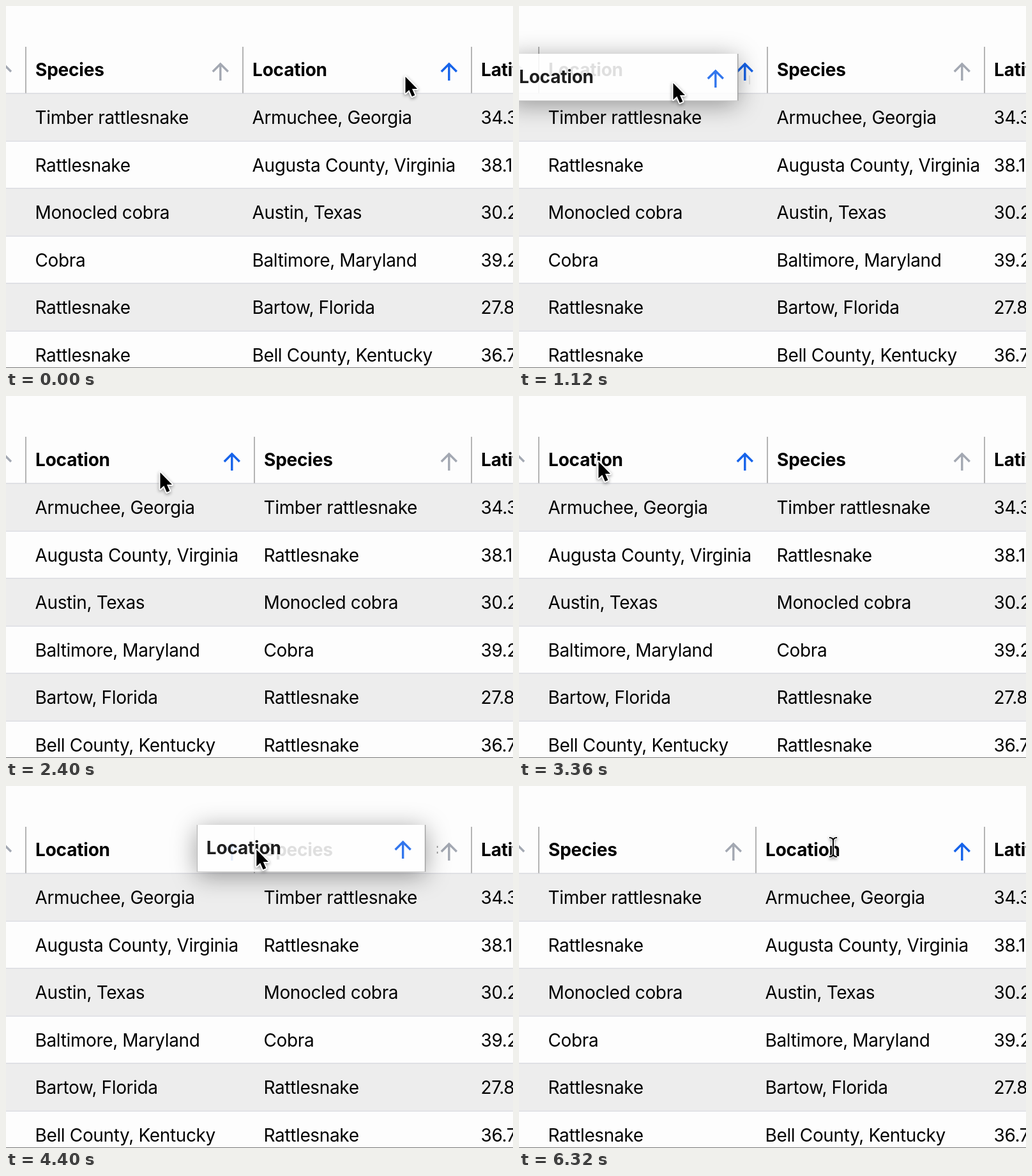
An HTML page with a canvas for the animation above (6.4 s loop, 794 by 568 pixels).

```html
<!DOCTYPE html>
<html lang="en">
<head>
<meta charset="utf-8">
<title>Column reordering</title>
<style>
html, body { margin: 0; height: 100%; overflow: hidden; background: #fdfdfd; }
canvas { display: block; }
</style>
</head>
<body>
<canvas id="stage" width="794" height="568"></canvas>
<script>
const ctx = document.getElementById('stage').getContext('2d');
const LOOP = 6400, STEP = 80;
const HEAD_TOP = 64, HEAD_BOTTOM = 137, ROW = 74.5;
const BLUE = '#1663ea', GRAY = '#a3a8b2', RULE = '#949494';
const WIDTH = { Species: 340, Location: 358 };

const rows = [
  ['Timber rattlesnake', 'Armuchee, Georgia', '34.3'],
  ['Rattlesnake', 'Augusta County, Virginia', '38.1'],
  ['Monocled cobra', 'Austin, Texas', '30.2'],
  ['Cobra', 'Baltimore, Maryland', '39.2'],
  ['Rattlesnake', 'Bartow, Florida', '27.8'],
  ['Rattlesnake', 'Bell County, Kentucky', '36.7']
];

// time, pointer x, pointer y
const pointerPath = [
  [0, 625, 110], [400, 625, 110], [480, 618, 111], [560, 580, 114],
  [800, 367, 119], [960, 286, 120], [1120, 241, 120], [2400, 241, 119],
  [2880, 241, 119], [3360, 124, 102], [3440, 140, 102], [3520, 188, 102],
  [3600, 200, 102], [4000, 236, 102], [4320, 371, 100], [4800, 496, 94]
];
// time, dragged header x, y
const dragPath = [
  [400, 371, 64], [480, 365, 65], [560, 329, 68],
  [800, 118, 74], [960, 35, 75], [1120, -15, 75]
];

function along(path, t) {
  const next = path.findIndex(p => p[0] > t);
  if (next < 0) return path.at(-1).slice(1);
  const a = path[Math.max(0, next - 1)], b = path[next];
  const k = a === b ? 0 : (t - a[0]) / (b[0] - a[0]);
  return [a[1] + (b[1] - a[1]) * k, a[2] + (b[2] - a[2]) * k];
}

// Set at 14px and doubled, so the font keeps its small optical size
function text(str, x, y, weight = 440) {
  ctx.save();
  ctx.translate(x, y);
  ctx.scale(2, 2);
  ctx.font = `${weight} 14px Inter, sans-serif`;
  ctx.letterSpacing = weight > 600 ? '-0.1px' : '-0.18px';
  ctx.fillStyle = '#000';
  ctx.fillText(str, 0, 0);
  ctx.restore();
}

function rect(x, y, w, h, color) {
  ctx.fillStyle = color;
  ctx.fillRect(x, y, w, h);
}

function arrow(x, y, color) {
  ctx.strokeStyle = color;
  ctx.lineWidth = 3.4;
  ctx.lineJoin = 'miter';
  ctx.stroke(new Path2D(`M${x} ${y + 14}V${y - 11}M${x - 12} ${y}l12-12 12 12`));
}

function header(name, x, y) {
  text(name, x + 15, y + 46, 700);
  arrow(x + WIDTH[name] - 35.2, y + 39, name === 'Location' ? BLUE : GRAY);
}

function table(headerSwapped, bodySwapped) {
  rect(0, 0, 794, 568, '#fdfdfd');
  const names = headerSwapped ? ['Location', 'Species'] : ['Species', 'Location'];
  const columns = [31, 31 + WIDTH[names[0]], 729];
  for (const x of columns) rect(x - 0.7, HEAD_TOP, 1.4, HEAD_BOTTOM - HEAD_TOP, RULE);
  names.forEach((name, i) => header(name, columns[i], HEAD_TOP));
  arrow(-4, 103, GRAY);
  text('Latitude', 744, 110, 700);

  rows.forEach(([species, place, latitude], i) => {
    const y = HEAD_BOTTOM + i * ROW;
    if (i % 2 === 0) rect(0, y, 794, ROW, '#ededed');
    rect(0, Math.round(y) - 0.5, 794, 1.2, '#d3d4dc');
    const cells = bodySwapped ? [place, species, latitude] : [species, place, latitude];
    cells.forEach((cell, c) => text(cell, columns[c] + 14.5, y + 48));
  });
  rect(0, 567, 794, 1, '#777');
}

function draggedHeader(x, y, slice) {
  const w = WIDTH.Location, h = 74;
  ctx.save();
  ctx.beginPath();
  ctx.rect(0, 0, 794, 568);
  ctx.rect(x, y, w, h);
  ctx.clip('evenodd');
  ctx.shadowColor = 'rgba(0,0,0,.38)';
  ctx.shadowBlur = 38;
  ctx.shadowOffsetY = 6;
  rect(x, y, w, h, '#fff');
  ctx.restore();

  ctx.save();
  ctx.globalAlpha = 0.88;
  rect(x, y, w, h, '#fefefe');
  rect(x, y, 1, h, RULE);
  rect(x + w - 1, y, 1.4, h, RULE);
  rect(x, y + h - 1, w, 1, '#c8c8c8');
  header('Location', x, y);
  // sliver of the neighbouring title
  if (slice === 'L') rect(x + w + 17.5, y + 34, 1, 14, '#bbb');
  else for (const dy of [33, 42]) rect(x + w + 18, y + dy, 1.5, 3, '#777');
  ctx.restore();
}

function outlined(path, ink) {
  ctx.save();
  ctx.lineJoin = 'round';
  ctx.shadowColor = 'rgba(0,0,0,.4)';
  ctx.shadowBlur = 5;
  ctx.shadowOffsetY = 2;
  ctx.strokeStyle = '#fff';
  ctx.lineWidth = 4;
  ctx.stroke(path);
  ctx.restore();
  ink();
}

function pointer(x, y) {
  const path = new Path2D(`M${x + 0.5} ${y + 1}v26l5.8-5.3 4.5 10.3 4.6-2-4.4-10h8z`);
  outlined(path, () => { ctx.fillStyle = '#000'; ctx.fill(path); });
}

function textCursor(x, y) {
  const path = new Path2D(`M${x - 6} ${y - 15}q6 0 6 5v20q0 5-6 5M${x + 6} ${y - 15}q-6 0-6 5v20q0 5 6 5`);
  outlined(path, () => {
    ctx.strokeStyle = '#000';
    ctx.lineWidth = 2;
    ctx.stroke(path);
  });
}

function draw(now) {
  const t = Math.floor(now % LOOP / STEP) * STEP;
  table(t >= 1040 && t < 4640, t >= 1280 && t < 5040);
  const [x, y] = along(pointerPath, t);
  if (t >= 480 && t < 1200) draggedHeader(...along(dragPath, t), 'L');
  if (t >= 3520 && t < 4960) draggedHeader(x - 93, y - 38, 'S');
  if (t >= 6320) textCursor(492, 96);
  else pointer(x, y);
}

const start = performance.now();
function tick() {
  draw(performance.now() - start);
  requestAnimationFrame(tick);
}
tick();
</script>
</body>
</html>
```
